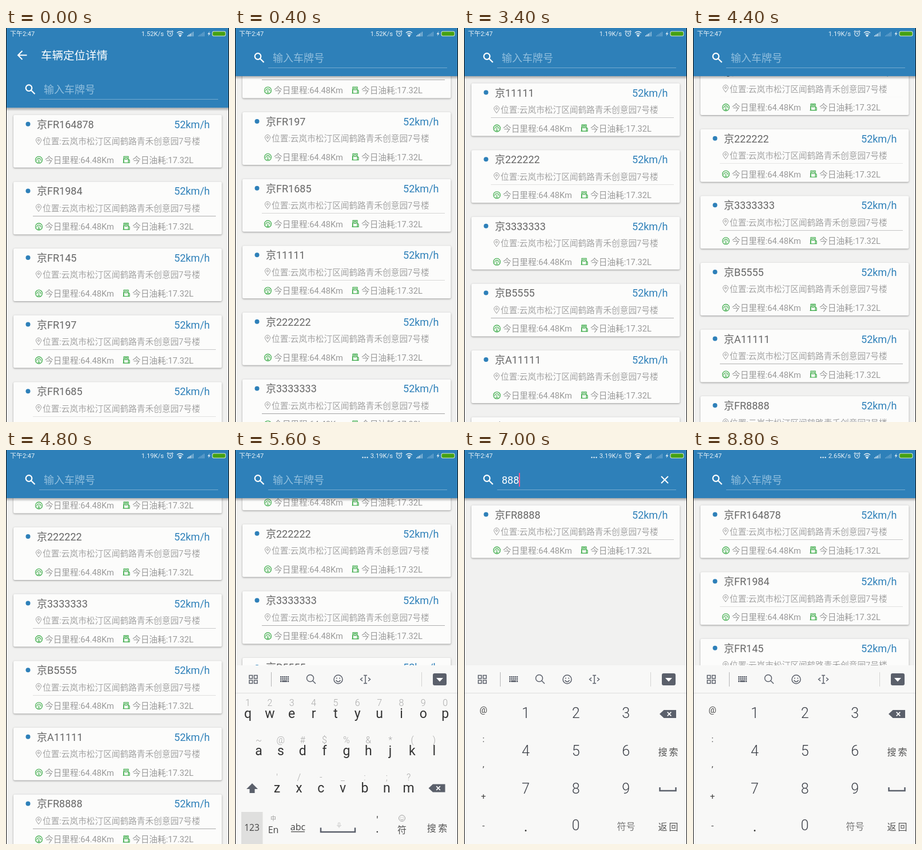
Recreate the animation shown at these times as an HTML page with a canvas. Size 390x688 px, loop 9 s.

```html
<!DOCTYPE html>
<html lang="zh-CN">
<head>
<meta charset="utf-8">
<title>车辆定位详情</title>
<style>
html, body { margin: 0; width: 100%; height: 100%; overflow: hidden; background: #f1f1f0; }
canvas { display: block; width: 390px; height: 688px; }
</style>
</head>
<body>
<canvas id="stage"></canvas>
<script>
const W = 390, H = 688, LOOP = 9000, STEP = 200;
const BLUE = '#2e80b9', GREEN = '#2ea53c', INK = '#5b606b';
const SANS = 'Roboto, "Noto Sans CJK SC", "Noto Sans CJK", sans-serif';
const OPEN = '"Open Sans", "Noto Sans CJK SC", sans-serif';
const BAR = 84, TOOLBAR = 55.2, PITCH = 116.6, CARD_TOP = 96.6;
const ADDRESS = '位置:云岚市松汀区闻鹤路青禾创意园7号楼';
const PLATES = ['FR164878', 'FR1984', 'FR145', 'FR197', 'FR1685',
  '11111', '222222', '3333333', 'B5555', 'A11111', 'FR8888'];
const PAGE = 10, PAGE_SCROLL = 5 * PITCH;

const canvas = document.getElementById('stage');
const ctx = canvas.getContext('2d');
const dpr = window.devicePixelRatio || 1;
canvas.width = W * dpr;
canvas.height = H * dpr;

const disc = (x, y, r) => `M${x - r} ${y}a${r} ${r} 0 1 0 ${2 * r} 0a${r} ${r} 0 1 0 ${-2 * r} 0`;
const ICONS = Object.fromEntries(Object.entries({
  back: 'M8 0H-7M0-7.5L-7.5 0L0 7.5',
  search: disc(-2.5, -2.5, 5.3) + 'M1.5 1.5L8 8',
  close: 'M-6-6L6 6M6-6L-6 6',
  pin: 'M0 6C-3 2-4.5 0-4.5-2a4.5 4.5 0 1 1 9 0C4.5 0 3 2 0 6Z' + disc(0, -2, 1.6),
  gauge: disc(0, 0, 6) + 'M-3.5 1.5a3.6 3.6 0 1 1 7 0M0-1V3M-2 4H2',
  pump: 'M-4.5 5.5V-5.5H3.5V5.5M-6 5.5H6M-2.5-3.5H1.5V-.5H-2.5ZM-5-2V5M3.5-1L5.5 1V5',
  alarm: disc(0, 0, 4.3) + 'M0-2.5V.5H2M-5.5-3.5L-3-5.5M5.5-3.5L3-5.5',
  wifi: 'M-5.5-2Q0-6.5 5.5-2M-3.5 .5Q0-2.5 3.5 .5M-1.6 2.6Q0 1 1.6 2.6L0 4.3Z',
  bolt: 'M1.5-4.5L-2.5 .8H0L-1.5 4.5L2.5-.8H0Z',
  grid: 'M-7-7H-1.5V-1.5H-7ZM1.5-7H7V-1.5H1.5ZM-7 1.5H-1.5V7H-7ZM1.5 1.5H7V7H1.5Z',
  lens: disc(-1.5, -1.5, 6) + 'M3 3L8 8',
  smile: disc(0, 0, 7.5) + 'M-4 1.5Q0 7 4 1.5M-2.7-3V-1M2.7-3V-1',
  caret: 'M-3-7H3M0-7V7M-3 7H3M-5-3L-8.5 0L-5 3M5-3L8.5 0L5 3',
  shift: 'M0-9L10 1H4.5V8H-4.5V1H-10Z',
  erase: 'M-14.5 0L-7-7H14.5V7H-7Z',
  space: 'M-14-3V3H14V-3',
  wideSpace: 'M-30-4V3.5H30V-4',
  mic: 'M-1.5-4H1.5V1H-1.5ZM-4 0Q0 5 4 0M0 3V5',
  drop: 'M-6-3H6L0 3.5Z'
}).map(([name, d]) => [name, new Path2D(d)]));

function icon(name, x, y, color, width = 0) {
  ctx.save();
  ctx.translate(x, y);
  if (width) {
    ctx.strokeStyle = color;
    ctx.lineWidth = width;
    ctx.stroke(ICONS[name]);
  } else {
    ctx.fillStyle = color;
    ctx.fill(ICONS[name]);
  }
  ctx.restore();
}

function text(s, x, y, size, color, align = 'left', family = SANS, weight = 400) {
  ctx.font = `${weight} ${size}px ${family}`;
  ctx.fillStyle = color;
  ctx.textAlign = align;
  ctx.fillText(s, x, y);
}

function rect(x, y, w, h, color) {
  ctx.fillStyle = color;
  ctx.fillRect(x, y, w, h);
}

function round(x, y, w, h, r, color) {
  ctx.fillStyle = color;
  ctx.beginPath();
  ctx.roundRect(x, y, w, h, r);
  ctx.fill();
}

function dot(x, y, r, color) {
  ctx.fillStyle = color;
  ctx.beginPath();
  ctx.arc(x, y, r, 0, 7);
  ctx.fill();
}

// A hairline survives downscaling only at some subpixel phases.
function hairline(y) {
  const phase = y - Math.floor(y);
  const gap = Math.min(Math.abs(phase - .85), 1 - Math.abs(phase - .85));
  ctx.globalAlpha = Math.max(0, 1 - gap / .35);
  rect(47, Math.round(y), 320, 1, '#a2a2a2');
  ctx.globalAlpha = 1;
}

function card(plate, y) {
  ctx.save();
  ctx.shadowColor = 'rgba(0,0,0,.38)';
  ctx.shadowBlur = 3 * dpr;
  ctx.shadowOffsetY = dpr;
  round(13, y, 364.5, 92, 2.5, '#fcfcfb');
  ctx.restore();
  const row = d => Math.round(y + d);
  dot(38.5, y + 16, 4, BLUE);
  text('京' + plate, 54, row(23), 18, '#666');
  text('52km/h', 356.5, row(23), 18, BLUE, 'right');
  icon('pin', 57, y + 46, '#999', 1);
  text(ADDRESS, 64, row(51.4), 14.67, '#a3a3a3');
  hairline(y + 59.4);
  icon('gauge', 57.5, y + 78.5, GREEN, 1.1);
  text('今日里程:64.48Km', 68, row(84), 14.67, '#999');
  icon('pump', 210.5, y + 78, GREEN, 1.1);
  text('今日油耗:17.32L', 221, row(84), 14.67, '#999');
}

function status(s) {
  const white = '#e8f1f7';
  text('下午2:47', 7, 14, 11, white);
  text(s.speed, 276, 14, 11.2, white, 'right');
  if (s.busy) for (let i = 0; i < 3; i++) dot(223.5 + i * 4, 13, 1.2, white);
  icon('alarm', 287, 10, white, 1.1);
  icon('wifi', 304.5, 10.5, white, 1.4);
  for (let i = 0; i < 5; i++) {
    rect(317 + i * 2.4, 13 - i * 1.6, 1.5, 1.6 + i * 1.6, i < 3 ? white : '#8fbbd9');
    rect(336 + i * 2.4, 13 - i * 1.6, 1.5, 1.6 + i * 1.6, '#6da6cf');
  }
  icon('bolt', 355, 10, white);
  round(360.5, 5.5, 24, 9, 3, '#d6e8d2');
  round(361.5, 6.5, 22, 7, 2, '#45a112');
}

function header(s) {
  const bottom = BAR + s.toolbar;
  const shade = ctx.createLinearGradient(0, bottom, 0, bottom + 6);
  shade.addColorStop(0, 'rgba(0,0,0,.3)');
  shade.addColorStop(1, 'rgba(0,0,0,0)');
  rect(0, bottom, W, 6, shade);
  rect(0, 0, W, bottom, BLUE);

  if (s.toolbar > 0) {
    const lift = s.toolbar - TOOLBAR;
    icon('back', 28.5, 47.5 + lift, '#fff', 2);
    text('车辆定位详情', 61, 55 + lift, 19.5, '#fff');
  }
  const y = s.toolbar;
  icon('search', 42.5, 52 + y, '#fff', 2.2);
  rect(58, Math.round(69 + y), 313, 1, '#72a9d0');
  if (s.query) {
    text(s.query, 66, 59 + y, 18, '#fff');
    rect(96, 40 + y, 2, 24, '#f0568a');
    icon('close', 351, 52 + y, '#fff', 2);
  } else {
    text('输入车牌号', 66, Math.round(58.5 + y), 18, '#90bedd');
  }
  status(s);
}

function keyRow(keys, hints, x, y) {
  [...keys].forEach((key, i) => {
    const cx = x + i * 38.35;
    text(hints[i], cx, y - 21, 16, '#aaa', 'center', SANS, 300);
    text(key, cx, y, 23, '#333', 'center');
  });
}

function eraseKey(x, y) {
  icon('erase', x, y, INK);
  ctx.save();
  ctx.translate(x + 2.5, y);
  ctx.scale(.55, .55);
  icon('close', 0, 0, '#fff', 3);
  ctx.restore();
}

function wordKey(word, x, y, gap, color) {
  text(word[0], x - gap, y, 16, color, 'center');
  text(word[1], x + gap, y, 16, color, 'center');
}

function letterKeys() {
  keyRow('qwertyuiop', '1234567890', 22.5, 468);
  keyRow('asdfghjkl', '~@#$%&*()', 41.5, 533);
  keyRow('zxcvbnm', "'/-_:;?", 73.5, 598);
  icon('shift', 30, 591, INK);
  eraseKey(353, 590.5);
  rect(11, 632, 37.5, 56, '#dfdfde');
  text('123', 29.5, 665, 15.5, '#444', 'center', OPEN);
  text('中', 67, 647, 10, '#999', 'center');
  text('En', 67, 669, 16, '#444', 'center', OPEN);
  text('abc', 110, 664, 16, '#444', 'center', OPEN);
  rect(98, 666, 24, 1.2, '#444');
  icon('mic', 182, 655, '#ccc', 1);
  icon('wideSpace', 180, 663.5, INK, 2.5);
  text("'", 249, 653, 19, '#444', 'center');
  text('.', 249, 668, 22, '#333', 'center');
  ctx.save();
  ctx.translate(292, 643);
  ctx.scale(.72, .72);
  icon('smile', 0, 0, '#999', 1.3);
  ctx.restore();
  text('符', 292, 669, 16, '#555', 'center');
  wordKey('搜索', 353.5, 666, 9.7, '#555');
}

function numberKeys() {
  ['@', ':', ',', '+', '-'].forEach((c, i) =>
    text(c, 34, [459, 510, 554, 610, 661][i], 15, '#444', 'center'));
  for (let n = 0; n < 9; n++) {
    text(n + 1, 108 + n % 3 * 87.6, 468 + Math.floor(n / 3) * 66, 25, '#3b3f47', 'center', SANS, 300);
  }
  text('.', 108, 666, 25, '#333', 'center');
  text('0', 195.5, 664, 25, '#3b3f47', 'center', SANS, 300);
  text('符号', 283.5, 663, 16, '#777', 'center');
  eraseKey(356.5, 461);
  wordKey('搜索', 357, 533, 9.5, '#555');
  icon('space', 356.5, 592, INK, 2.5);
  wordKey('返回', 357, 663.5, 9.5, '#555');
}

function keyboard(numeric) {
  rect(0, 376, W, 312, '#f8f8f7');
  rect(0, 424, W, 1, '#dedede');
  icon('grid', 32, 400.5, INK, 1.5);
  rect(63, 388, 1, 25, '#b5b5b5');
  for (let i = 0; i < 10; i++) rect(79 + i % 5 * 3.2, 395 + Math.floor(i / 5) * 3.6, 2.4, 2.5, INK);
  rect(79, 402.2, 2.4, 3, INK);
  rect(82.2, 402.2, 8.8, 3, INK);
  rect(91.8, 402.2, 2.4, 3, INK);
  icon('lens', 133, 400, INK, 1.5);
  icon('smile', 180.5, 400.5, INK, 1.5);
  icon('caret', 228, 400.5, INK, 1.5);
  rect(326, 388, 1, 25, '#d2d2d2');
  round(346, 390, 24, 21, 3, INK);
  icon('drop', 358, 401, '#fff');
  numeric ? numberKeys() : letterKeys();
}

const clamp = v => Math.max(0, Math.min(1, v));
const easeOut = p => 1 - (1 - clamp(p)) ** 2;

function typed(t) {
  const count = t < 7800 ? Math.floor((t - 6400) / STEP) : 3 - Math.floor((t - 7800) / STEP);
  return '8'.repeat(Math.max(0, Math.min(3, count)));
}

function stateAt(t) {
  const travel = easeOut(t / 1200) * (TOOLBAR + PAGE_SCROLL);
  const query = typed(t);
  const searching = t >= 6600;
  return {
    query,
    toolbar: Math.max(0, TOOLBAR - travel),
    scroll: searching ? 0 : Math.max(0, travel - TOOLBAR) + 83.4 * easeOut((t - 4200) / 800),
    loading: t < 2400,
    plates: t < 2400 ? PLATES.slice(0, PAGE) : PLATES.filter(p => p.includes(query)),
    speed: t < 1400 ? '1.52K/s' : t < 5200 ? '1.19K/s' : t < 8800 ? '3.19K/s' : '2.65K/s',
    busy: t >= 5200,
    keys: t >= 5600,
    numeric: t >= 6000
  };
}

function draw(t) {
  const s = stateAt(t);
  const top = CARD_TOP + s.toolbar - s.scroll;
  ctx.setTransform(dpr, 0, 0, dpr, 0, 0);
  rect(0, 0, W, H, '#f1f1f0');
  s.plates.forEach((plate, i) => {
    const y = top + i * PITCH;
    if (y > -100 && y < H) card(plate, y);
  });
  if (s.loading) {
    const y = top + PAGE * PITCH;
    for (let i = 0; i < 3; i++) {
      dot(150 + i * 7, y - 1.5, 1.1 + .5 * Math.sin(t / 150 - i), '#999');
    }
    text('正在加载...', 177, y + 4, 14, '#777');
  }
  header(s);
  if (s.keys) keyboard(s.numeric);
  rect(0, 0, 1, H, '#111');
  rect(W - 1, 0, 1, H, '#111');
}

const start = performance.now();
function tick() {
  const t = (performance.now() - start) % LOOP;
  draw(Math.floor(t / STEP) * STEP);
  requestAnimationFrame(tick);
}
tick();
</script>
</body>
</html>
```
